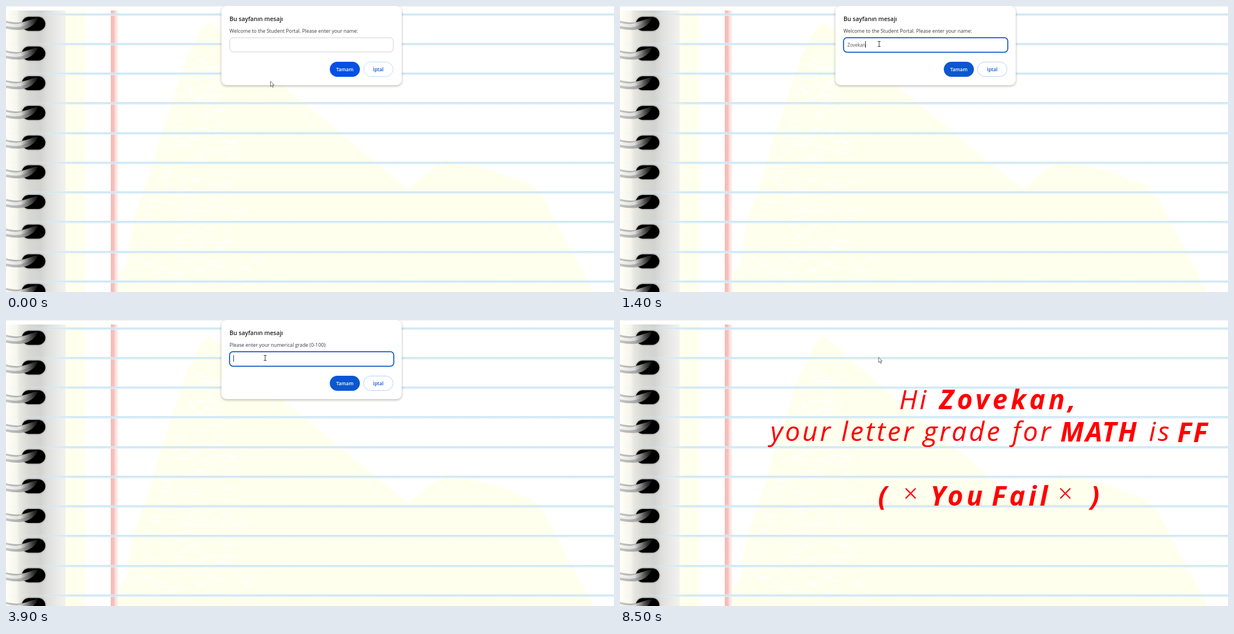
Animation, 1091 px wide and 513 px high, one loop 8600 ms. Source, as an HTML page with a canvas:

```html
<!DOCTYPE html>
<html lang="en">
<head>
<meta charset="utf-8">
<title>Student Portal</title>
<style>
  html, body { margin: 0; width: 100%; height: 100%; overflow: hidden; background: #fff; }
  canvas { display: block; }
</style>
</head>
<body>
<canvas id="stage" width="1091" height="513"></canvas>
<script>
const W = 1091, H = 513, LOOP = 8600;
const SANS = '"Open Sans", "Noto Sans", sans-serif';
const CREAM = '#ffffee', BLUE = '#0b57d0';
const NAME = 'Zovekan';
const ASK_NAME = 'Welcome to the Student Portal. Please enter your name:';
const ASK_LECTURE = 'Please enter your lecture:';
const ASK_GRADE = 'Please enter your numerical grade (0-100):';

// start time, question, typed text, caret shown
const STEPS = [
  [0, ASK_NAME, '', false],
  [100, ASK_NAME, '', true],
  [500, ASK_NAME, NAME.slice(0, 1), true],
  [900, ASK_NAME, NAME.slice(0, 2), true],
  [1100, ASK_NAME, NAME.slice(0, 3), true],
  [1200, ASK_NAME, NAME.slice(0, 4), true],
  [1300, ASK_NAME, NAME.slice(0, 5), true],
  [1400, ASK_NAME, NAME, true],
  [2000, ASK_LECTURE, '', true],
  [2600, ASK_LECTURE, '', false],
  [3000, ASK_LECTURE, 'M', true],
  [3100, ASK_LECTURE, 'MA', true],
  [3500, ASK_LECTURE, 'MAT', true],
  [3700, ASK_LECTURE, 'MATH', true],
  [3900, ASK_GRADE, '', true],
  [4400, ASK_GRADE, '', false],
  [4800, ASK_GRADE, '3', true],
  [4900, ASK_GRADE, '30', true],
  [5400, ASK_GRADE, '30', false]
];
const RESULT_AT = 5600;

const ctx = document.getElementById('stage').getContext('2d');

function seeded(seed) {
  return () => (seed = (seed * 16807) % 2147483647) / 2147483647;
}

function gradient(c, x0, y0, x1, y1, stops) {
  const g = c.createLinearGradient(x0, y0, x1, y1);
  stops.forEach(([at, color]) => g.addColorStop(at, color));
  return g;
}

function polygon(c, pts) {
  c.beginPath();
  pts.forEach(([x, y]) => c.lineTo(x, y));
  c.closePath();
}

function roundBox(c, x, y, w, h, r) {
  c.beginPath();
  c.roundRect(x, y, w, h, r);
}

function text(c, str, x, y, font, color, spacing = 0) {
  c.font = font;
  c.fillStyle = color;
  c.letterSpacing = spacing + 'px';
  c.fillText(str, x, y);
}

function drawTint(c) {
  polygon(c, [
    [200, H], [203, 480], [217, 462], [222, 420], [230, 380], [246, 335], [262, 288],
    [277, 232], [293, 190], [308, 140], [325, 92], [350, 42], [365, 28],
    [383, 43], [497, 143], [575, 207], [650, 270], [722, 328], [765, 292], [790, 276], [870, 294],
    [945, 322], [967, 347], [985, 383], [1015, 438], [1043, 490], [1054, H]
  ]);
  c.fillStyle = CREAM;
  c.fill();

  // pale streaks along the left flank
  const rnd = seeded(71);
  c.fillStyle = '#fff';
  for (let i = 0; i < 260; i++) {
    const y = 95 + rnd() * 405;
    const left = 325 - (y - 95) * 0.3;
    const x = left + rnd() * (50 + (y - 95) * 0.5);
    c.fillRect(Math.round(x), Math.round(y), 4 + rnd() * 15, 2);
  }
}

function drawMargin(c) {
  c.fillStyle = gradient(c, 0, 0, 107, 0, [
    [0, '#fffff8'], [0.18, '#f6f6ef'], [0.23, '#e8e8e1'], [0.4, '#d7d7d3'],
    [0.58, '#d2d2d0'], [0.7, '#dfdfdc'], [0.85, '#e9e9e7'], [1, '#f3f2ef']
  ]);
  c.fillRect(0, 8, 107, H);
  c.fillStyle = CREAM;
  c.fillRect(107, 8, 36, H);
}

function drawRules(c) {
  c.fillStyle = gradient(c, 188, 0, 201, 0, [
    [0, '#f4b9b5'], [0.45, '#f6c1bd'], [0.6, '#fadad7'], [1, '#fff3f1']
  ]);
  c.fillRect(188, 8, 13, H);
  const fade = (rgb, alpha) => gradient(c, 0, 0, 120, 0, [
    [0, `rgba(${rgb},0)`], [0.6, `rgba(${rgb},${alpha * 0.3})`], [1, `rgba(${rgb},${alpha})`]
  ]);
  const soft = fade('222,239,248', 0.8), core = fade('196,225,240', 0.7);
  for (let i = 0; i < 10; i++) {
    const y = Math.round(14.7 + i * 53.25);
    c.fillStyle = soft;
    c.fillRect(0, y - 2, W, 5);
    c.fillStyle = core;
    c.fillRect(0, y - 1, W, 2);
  }
}

function drawRing(c, y) {
  c.save();
  c.translate(0, y);
  c.shadowColor = 'rgba(0,0,0,.55)';
  c.shadowBlur = 3;
  c.fillStyle = '#000';
  roundBox(c, 28.5, -12.5, 42, 25, 12.5);
  c.fill();
  c.shadowBlur = 0;

  // tube that tapers into the hole
  c.beginPath();
  c.moveTo(-2, -6);
  c.bezierCurveTo(12, -2, 26, -1, 40, -6);
  c.quadraticCurveTo(50, -9, 58, -12);
  c.bezierCurveTo(54, 0, 42, 10, 24, 11);
  c.bezierCurveTo(14, 11, 6, 10, -2, 8);
  c.closePath();
  c.fillStyle = gradient(c, 0, 0, 58, -8, [
    [0, '#c4c4c2'], [0.45, '#a9a9a7'], [0.65, '#747473'], [0.85, '#30302f'], [1, '#0a0a0a']
  ]);
  c.fill();
  c.clip();
  c.beginPath();
  c.moveTo(-4, 0);
  c.bezierCurveTo(14, 5, 28, 5, 44, -6);
  c.lineWidth = 6;
  c.strokeStyle = gradient(c, 0, 0, 44, 0, [
    [0, 'rgba(255,255,255,.85)'], [0.6, 'rgba(245,245,245,.65)'], [1, 'rgba(150,150,150,0)']
  ]);
  c.stroke();
  c.restore();
}

function makePaper() {
  const sheet = document.createElement('canvas');
  sheet.width = W;
  sheet.height = H;
  const c = sheet.getContext('2d');
  c.fillStyle = '#fff';
  c.fillRect(0, 0, W, H);
  drawTint(c);
  drawMargin(c);
  drawRules(c);
  for (let i = 0; i < 10; i++) drawRing(c, 32 + i * 53.25);
  c.fillStyle = '#efefef';
  c.fillRect(0, 0, W, 1);
  return sheet;
}

function drawArrow(x, y) {
  polygon(ctx, [[0, 0], [0, 9.4], [2.2, 7.4], [3.8, 10.8], [5.2, 10.1], [3.7, 6.8], [6.6, 6.6]]
    .map(([px, py]) => [x + px, y + py]));
  ctx.fillStyle = '#fff';
  ctx.fill();
  ctx.strokeStyle = '#444';
  ctx.lineWidth = 0.8;
  ctx.stroke();
}

function drawBeam(x, y) {
  ctx.fillStyle = '#333';
  ctx.fillRect(x - 0.5, y - 5, 1, 10);
  ctx.fillRect(x - 2.5, y - 5, 5, 1);
  ctx.fillRect(x - 2.5, y + 4, 5, 1);
}

function drawDialog(question, typed, caret, focused) {
  ctx.save();
  ctx.shadowColor = 'rgba(60,60,40,.38)';
  ctx.shadowBlur = 4;
  ctx.shadowOffsetY = 1.5;
  ctx.fillStyle = '#fff';
  roundBox(ctx, 386.5, 0, 323.5, 142, 9);
  ctx.fill();
  ctx.restore();

  text(ctx, 'Bu sayfanın mesajı', 401, 26.5, `600 10.6px ${SANS}`, '#1f1f1f');
  text(ctx, question, 401, 47.5, `8.84px ${SANS}`, '#3a3a3a');

  if (focused) {
    roundBox(ctx, 401.2, 56.8, 294.6, 26, 6);
    ctx.lineWidth = 1.8;
    ctx.strokeStyle = BLUE;
  } else {
    roundBox(ctx, 401.5, 57, 293.5, 25.3, 6);
    ctx.lineWidth = 1;
    ctx.strokeStyle = '#cdcfd3';
  }
  ctx.stroke();

  text(ctx, typed, 408, 73, `8.3px ${SANS}`, '#505050');
  if (caret) {
    const x = 408 + Math.round(ctx.measureText(typed).width);
    ctx.fillStyle = '#333';
    ctx.fillRect(x, 63, 1, 12);
  }

  const main = focused ? BLUE : '#0750e6';
  roundBox(ctx, 581, 100, 54, 27, 13.5);
  ctx.fillStyle = main;
  ctx.fill();
  roundBox(ctx, 641.5, 100.5, 53, 26, 13);
  ctx.lineWidth = 1;
  ctx.strokeStyle = focused ? '#b4cff5' : '#b5e0f8';
  ctx.stroke();
  ctx.textAlign = 'center';
  text(ctx, 'Tamam', 608, 117.3, `600 8.7px ${SANS}`, '#fff');
  text(ctx, 'İptal', 668, 117.3, `600 8.7px ${SANS}`, main);
  ctx.textAlign = 'left';
}

function drawResult() {
  const write = (weight, spacing) => (str, x, y) =>
    text(ctx, str, x, y, `italic ${weight} 48px ${SANS}`, '#f00', spacing);
  const plain = write(500, 4), bold = write(700, 6), caps = write(700, 3);
  const cross = (x, y) => {
    ctx.beginPath();
    ctx.moveTo(x - 9, y - 9);
    ctx.lineTo(x + 9, y + 9);
    ctx.moveTo(x + 9, y - 9);
    ctx.lineTo(x - 9, y + 9);
    ctx.lineWidth = 2.4;
    ctx.strokeStyle = '#f00';
    ctx.stroke();
  };
  plain('Hi', 501, 160);
  bold(NAME + ',', 573, 160);
  plain('your', 270, 217);
  plain('letter', 397, 217);
  plain('grade', 545, 217);
  plain('for', 704, 217);
  caps('MATH', 790, 218);
  plain('is', 949, 217);
  caps('FF', 1000, 219);
  caps('(', 463, 333);
  cross(521.5, 311);
  bold('You', 557, 333);
  bold('Fail', 667, 333);
  cross(799, 311);
  caps(')', 844, 333);
}

const paper = makePaper();

function draw(t) {
  ctx.drawImage(paper, 0, 0);
  if (t >= RESULT_AT) {
    drawResult();
    drawArrow(464, 67);
    return;
  }
  const [start, question, typed, caret] = STEPS.findLast(s => s[0] <= t);
  const focused = start > 0;
  drawDialog(question, typed, caret, focused);
  if (focused) drawBeam(465, 68);
  else drawArrow(474.5, 135);
}

const begin = performance.now();
function frame() {
  draw((performance.now() - begin) % LOOP);
  requestAnimationFrame(frame);
}
frame();
</script>
</body>
</html>
```
